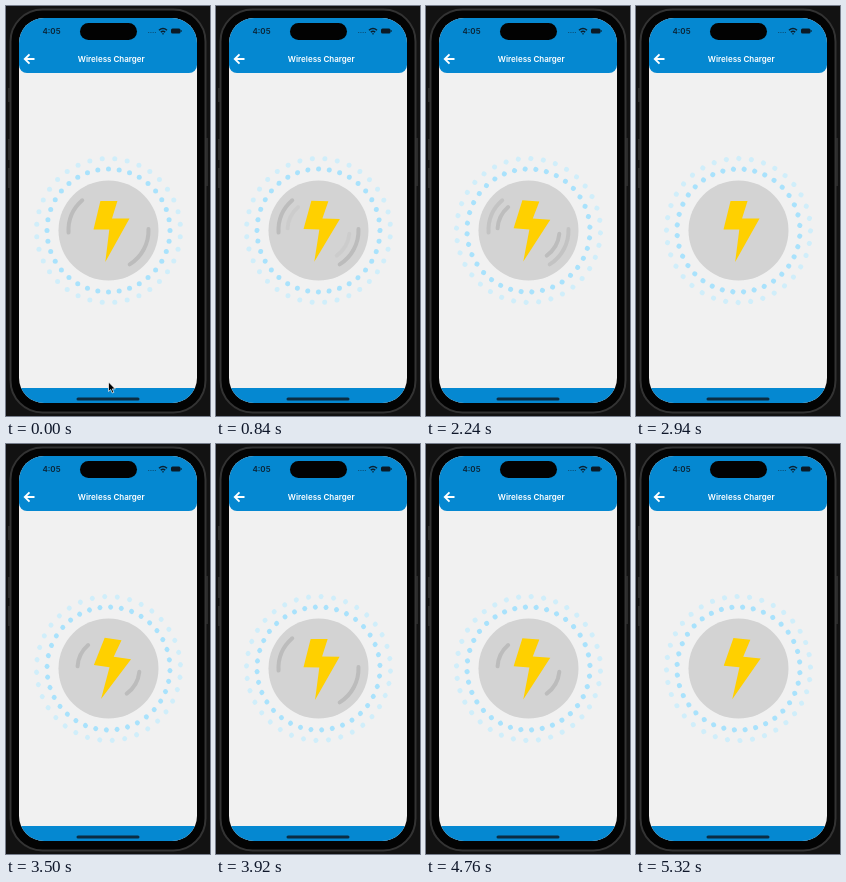
These frames come from a looping animation (204 by 410 pixels, 5.46 s). An HTML page:

```html
<!DOCTYPE html>
<html lang="en">
<head>
<meta charset="utf-8">
<title>Wireless Charger</title>
<style>
  html, body { margin: 0; width: 100%; height: 100%; overflow: hidden; background: #121212; }
  svg { display: block; width: 204px; height: 410px; filter: blur(.45px); }
  text { font-family: Inter, Roboto, sans-serif; font-weight: 600; text-anchor: middle; }
  .arc { fill: none; stroke: #bcbcbc; stroke-width: 4; stroke-linecap: round; }
</style>
</head>
<body>
<svg viewBox="0 0 204 410">
  <defs><clipPath id="screen"><rect x="13" y="12" width="178" height="385" rx="25"/></clipPath></defs>
  <rect width="204" height="410" fill="#121212"/>
  <path d="M3 82V96M3 133V154M3 162V182M201 132V180" stroke="#2a2a2a" stroke-width="2"/>
  <rect x="4.5" y="3.5" width="195" height="403" rx="32" fill="#030303" stroke="#333" stroke-width="2"/>

  <g clip-path="url(#screen)">
    <rect x="13" y="12" width="178" height="385" fill="#f1f1f1"/>
    <rect x="13" y="0" width="178" height="67" rx="8" fill="#0588d1"/>
    <rect x="13" y="382" width="178" height="15" fill="#0588d1"/>
  </g>
  <rect x="74" y="17" width="57" height="17" rx="8.5" fill="#020202"/>
  <text x="45.5" y="28" font-size="8" fill="#0b2538">4:05</text>
  <path d="M142 26.5H150" stroke="#0a5580" stroke-width="1.2" stroke-dasharray="1.2 1.1"/>
  <g fill="none" stroke="#0b2030" stroke-width="1.5">
    <path d="M153 24.2Q157 20.8 161 24.2M154.8 26.2Q157 24.4 159.2 26.2"/>
    <path d="M156.4 27.8H157.6"/>
  </g>
  <rect x="165" y="22.5" width="9.5" height="5" rx="1.5" fill="#0b1a26"/>
  <path d="M175.2 24V26" stroke="#0b1a26" stroke-width=".8"/>
  <path d="M28.5 53H19M23.5 48.3L18.8 53L23.5 57.7" fill="none" stroke="#fff" stroke-width="1.9"/>
  <text x="105.3" y="56" font-size="8" fill="#fff">Wireless Charger</text>
  <rect x="70.5" y="391.5" width="63" height="3" rx="1.5" fill="#0a2c42"/>

  <g id="dots"></g>
  <circle cx="102.5" cy="224.5" r="50" fill="#d3d3d3"/>
  <g id="inner" class="arc"></g>
  <g id="outer" class="arc"></g>
  <path id="bolt" d="M94.4 195H111.4L106 212.5H123.5L99.3 256L103.3 223.5H87.5Z" fill="#ffd000"/>
  <path id="cursor" d="M0 0V9.5L2.2 7.5L3.8 11L5.4 10.3L3.8 6.9H6.8Z" fill="#000" stroke="#fff" stroke-width=".7"/>
</svg>
<script>
const LOOP = 5460, STEP = 140, CX = 102.5, CY = 224.5;
const TURN = 30000, SWING = 1000, DOTS = 36;
const waveStarts = [-780, 280, 1780, 3180, 4420];
const $ = id => document.getElementById(id);
const clamp = v => Math.max(0, Math.min(1, v));
const polar = (r, deg) => {
  const a = deg * Math.PI / 180;
  return [CX + r * Math.cos(a), CY + r * Math.sin(a)].map(v => v.toFixed(2));
};
const arc = (r, from, to) => `<path d="M${polar(r, from)}A${r} ${r} 0 0 1 ${polar(r, to)}"/>`;

function ring(r, size, color, offset) {
  let s = "";
  for (let i = 0; i < DOTS; i++) {
    const [x, y] = polar(r, i * 360 / DOTS + offset);
    s += `<circle cx="${x}" cy="${y}" r="${size}" fill="${color}"/>`;
  }
  return s;
}
$("dots").innerHTML = ring(61.5, 2.5, "#a9e2fc", 0) + ring(72, 2.5, "#d0eefa", 5);
$("outer").innerHTML = arc(40, 177, 229) + arc(40, -2, 58);
$("inner").innerHTML = arc(31, 184, 229) + arc(31, 6, 54);

// Fades in from a to b, then out from c to d
const pulse = (u, a, b, c, d) => clamp((u - a) / (b - a)) * clamp((d - u) / (d - c));

function draw(t) {
  const u = t - waveStarts.findLast(s => s <= t);
  $("inner").setAttribute("opacity", pulse(u, 100, 300, 450, 600));
  $("outer").setAttribute("opacity", pulse(u, 340, 520, 780, 880));

  $("dots").setAttribute("transform", `rotate(${360 * t / TURN} ${CX} ${CY})`);
  const tilt = 4 * (1 - Math.cos(2 * Math.PI * t / SWING));
  $("bolt").setAttribute("transform", `rotate(${tilt} 105 225)`);

  const k = clamp((t - 140) / 560);
  $("cursor").setAttribute("transform", `translate(${102.5 - 115 * k * k} ${376 - 16 * k})`);
}

const start = performance.now();
function tick() {
  const t = (performance.now() - start) % LOOP;
  draw(Math.floor(t / STEP) * STEP);
  requestAnimationFrame(tick);
}
tick();
</script>
</body>
</html>
```
